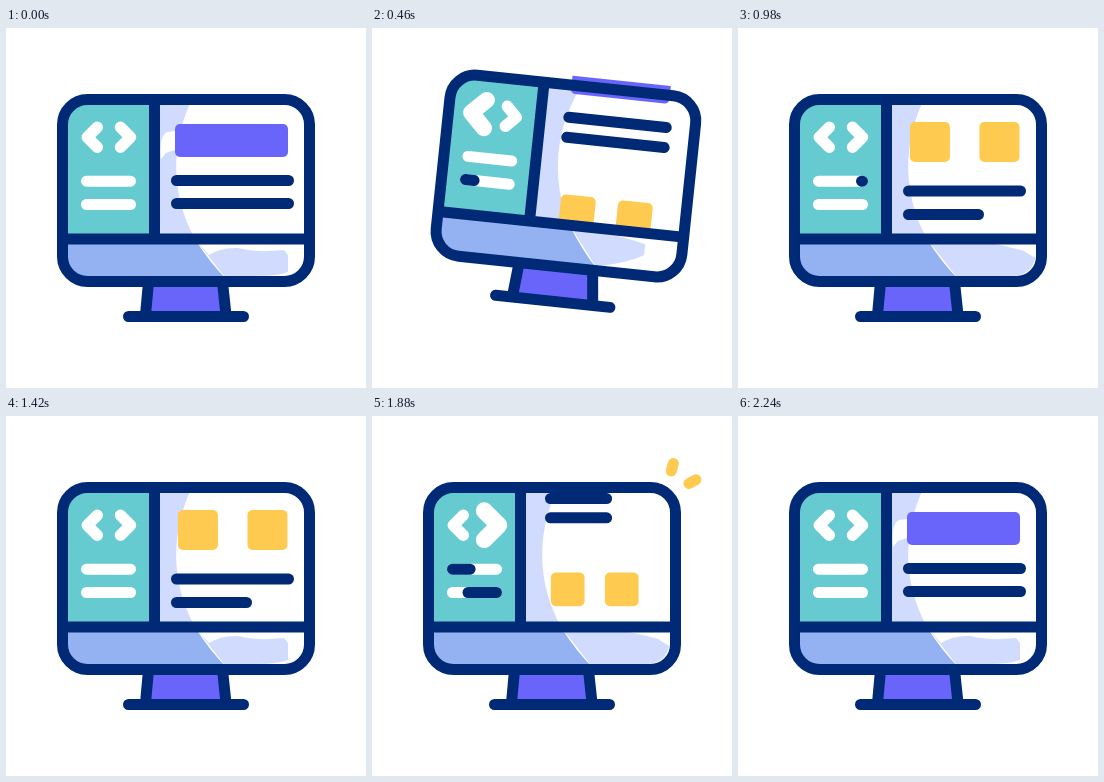
Animation, 360 px wide and 360 px high, one loop 2400 ms. Source, as an HTML page with a canvas:

```html
<!DOCTYPE html>
<html lang="en">
<head>
<meta charset="utf-8">
<title>Web design icon</title>
<style>
  html, body { margin: 0; width: 100%; height: 100%; overflow: hidden; background: #fff; }
  canvas { display: block; width: 100vw; height: 100vh; }
</style>
</head>
<body>
<canvas id="stage" width="360" height="360"></canvas>
<script>
const ctx = document.getElementById('stage').getContext('2d');
const LOOP = 2400, STROKE = 11, PAGE = 146.5;
const NAVY = '#002a75', TEAL = '#66cbd0', BLUE = '#94b1f2', PALE = '#d1dbfd',
      PURPLE = '#6965fb', YELLOW = '#ffca50', WHITE = '#fff';

const span = (t, a, b) => Math.min(1, Math.max(0, (t - a) / (b - a)));
const ease = (t, a, b) => (1 - Math.cos(Math.PI * span(t, a, b))) / 2;
const pulse = (t, a, b) => Math.sin(Math.PI * span(t, a, b));

function fill(path, color) {
  ctx.fillStyle = color;
  ctx.fill(new Path2D(path));
}
function stroke(path, color = NAVY, width = STROKE) {
  ctx.strokeStyle = color;
  ctx.lineWidth = width;
  ctx.stroke(new Path2D(path));
}
function box(x, y, w, h, r, color) {
  ctx.fillStyle = color;
  ctx.beginPath();
  ctx.roundRect(x, y, w, h, r);
  ctx.fill();
}
function clipTo(x, y, w, h, r, draw) {
  ctx.save();
  ctx.beginPath();
  ctx.roundRect(x, y, w, h, r);
  ctx.clip();
  draw();
  ctx.restore();
}
// The part of a straight line between fractions a and b.
function trim(x0, y0, x1, y1, a, b, color, width) {
  if (b - a < 0.005) return;
  const at = f => `${x0 + (x1 - x0) * f} ${y0 + (y1 - y0) * f}`;
  stroke(`M${at(a)}L${at(b)}`, color, width);
}

function drawStand() {
  fill('M142 254H217L220 288H139Z', PURPLE);
  stroke('M142.5 254L139.5 287M216.5 254L220 287M122.5 288.5H237.5');
}

function drawBackdrop(t, tilted, moving) {
  box(56, 71, 248, 183, 24, WHITE);
  clipTo(56, 71, 248, 183, 24, () => {
    fill('M56 71H148V211H56Z', TEAL);
    fill('M148 71H186C165 115 164 165 189 211H148Z', PALE);
    if (t < 380 || t >= 2200) fill('M155 131Q153 108 161 104L169 103V122L160 125Z', WHITE);
    let glare = 'M189 211L203 227Q216 219 232 220Q250 225 278 222L282 227V244Q272 248 250 248H218Z';
    if (tilted) glare = 'M189 211L214 214Q240 216 266 222V233Q250 242 225 248H218Z';
    else if (moving) glare = 'M189 211H230Q270 218 286 223L297 230Q294 246 276 248H218Z';
    fill(glare, PALE);
    fill('M56 211H189Q203 234 222 253H56Z', BLUE);
  });
}

function drawPage(t) {
  const scroll = ease(t, 220, 800) - ease(t, 1620, 2180);
  const k = 1 - 0.13 * pulse(t, 220, 800) - 0.16 * pulse(t, 1620, 2180);
  const Y = y => 141 + k * (y - 141);
  const left = 170.5 + 50 * (1 - k);
  const line = (y, length) => stroke(`M${left} ${Y(y)}h${length * k}`);
  const up = -PAGE * scroll, down = PAGE + up;

  clipTo(148, 62, 160, 149, 0, () => {
    const h = 33 * k * (1 - 0.6 * scroll);
    box(225.5 - 56.5 * k, Y(112.5 + up) - h / 2, 113 * k, h, 5 * k, PURPLE);
    const length = 112 * (t > 1400 ? 1 - 0.73 * scroll : 1);
    line(152.5 + up, length);
    line(175.5 + up, length);

    const size = 40 * k, middle = 226.7 - 25 * (1 - k), gap = 34.75 * (1.4 * k - 0.4);
    for (const side of [-1, 1])
      box(middle + side * gap - size / 2, Y(114 + down) - size / 2, size, size, 5, YELLOW);
    line(163 + down, 112);
    line(186.5 + down, Math.min(112, 70 + 65 * (1 - scroll)));
  });
}

function chevron(x, dir, scale) {
  ctx.save();
  ctx.translate(x, 109.3);
  ctx.scale(scale * dir, scale);
  stroke('M-5 -10L5 0L-5 10', WHITE, 11.5);
  ctx.restore();
}

function drawSidebar(t) {
  chevron(86.3, -1, 1 + 0.42 * pulse(t, 240, 740));
  chevron(119.5, 1, 1 + 0.46 * pulse(t, 1640, 2140));
  const row = (y, a, b, color) => trim(80.5, y, 124.5, y, a, b, color);
  const clock = t % 1200;
  [[153.2, 620], [176.5, 420]].forEach(([y, start]) => {
    row(y, 0, 1, WHITE);
    if (start === 620 && t < 380) row(y, 0, 0.66 * pulse(t, 240, 370), PALE);
    row(y, ease(clock, start + 180, start + 380), ease(clock, start, start + 140), NAVY);
  });
}

function drawFrame() {
  stroke('M148.5 72V211M57 211H303');
  ctx.beginPath();
  ctx.roundRect(56.5, 71.5, 247, 182, 25);
  ctx.stroke();
}

function drawSparks(t) {
  const head = ease(t, 1790, 2000), tail = ease(t, 2000, 2190);
  trim(299.3, 55, 304.5, 36, tail, head, YELLOW);
  trim(317, 67.5, 334.5, 58, tail, head, YELLOW);
}

function render(t) {
  const tilt = ease(t, 220, 380) - ease(t, 380, 640);
  const moving = (t > 240 && t < 1260) || (t > 1640 && t < 2160);
  ctx.fillStyle = WHITE;
  ctx.fillRect(0, 0, 360, 360);
  ctx.save();
  ctx.translate(325, 288);
  ctx.rotate(tilt * 7.7 * Math.PI / 180);
  ctx.translate(-325, -288);
  drawStand();
  drawBackdrop(t, tilt > 0.1, moving);
  drawPage(t);
  drawSidebar(t);
  drawFrame();
  ctx.restore();
  drawSparks(t);
}

ctx.lineCap = ctx.lineJoin = 'round';
const begin = performance.now();
(function tick() {
  render((performance.now() - begin) % LOOP);
  requestAnimationFrame(tick);
})();
</script>
</body>
</html>
```
